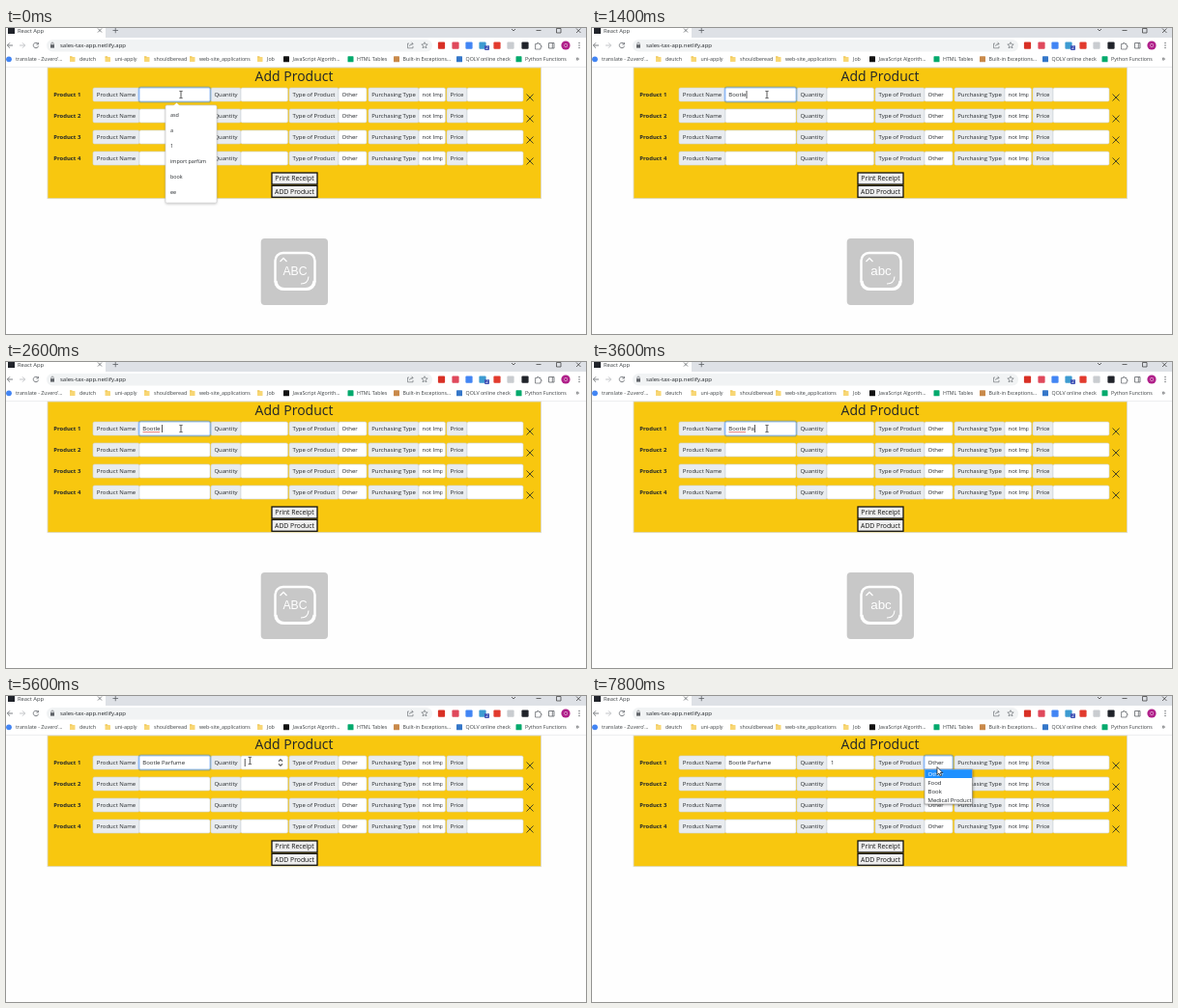
Write an HTML page that moves like this. It is 600 by 317 pixels and loops after 8000 ms.

```html
<!DOCTYPE html>
<html lang="en">
<head>
<meta charset="utf-8">
<title>Add Product</title>
<style>
html, body { margin: 0; width: 100%; height: 100%; overflow: hidden; background: #fefefe; }
svg { display: block; width: 600px; height: 317px; }
text { font-family: "Open Sans", "Noto Sans", sans-serif; white-space: pre; }
.key { font-family: "Liberation Sans", Arial, sans-serif; }
</style>
</head>
<body>
<svg viewBox="0 0 600 317" xmlns="http://www.w3.org/2000/svg">
  <defs><clipPath id="cut"><rect x="428" y="40" width="23.5" height="120"/></clipPath></defs>
  <g id="still"></g>
  <g id="live"></g>
</svg>
<script>
const LOOP = 8000, STEP = 200;
const INK = '#212529';
const still = document.getElementById('still'), live = document.getElementById('live');

const rect = (x, y, w, h, fill, extra = '') =>
  `<rect x="${x}" y="${y}" width="${w}" height="${h}" fill="${fill}" ${extra}/>`;
const path = (d, color, width = 0.8, extra = '') =>
  `<path d="${d}" fill="none" stroke="${color}" stroke-width="${width}" ${extra}/>`;
const dot = (x, y, r, fill) => `<circle cx="${x}" cy="${y}" r="${r}" fill="${fill}"/>`;
// Text is placed by its left edge and vertical centre.
const text = (s, x, y, size = 6, fill = INK, extra = '') =>
  `<text x="${x}" y="${y + size * 0.36}" font-size="${size}" fill="${fill}" ${extra}>${s}</text>`;
const centred = 'text-anchor="middle"';

function browser() {
  const gray = '#5f6368';
  let s = rect(0, 0, 600, 10, '#dee1e6') + rect(0, 0, 103, 10, '#fff') + rect(0, 10, 600, 30, '#fff');
  s += rect(2, -1, 7, 7, '#20232a') + text('React App', 12, 2.5, 5.8, '#3c4043');
  s += path('M95 0.5l4 4m0-4l-4 4M110.5 2.5h5.5m-2.75-2.75v5.5', gray);
  s += path('M523 1l2 2 2-2M548.5 2.5h5M569.5 0.5h4.5v4.5h-4.5zM590 0.5l4.5 4.5m0-4.5l-4.5 4.5', '#333', 0.7);
  s += rect(42, 12, 399, 12.5, '#f1f3f4', 'rx="6.2"');
  s += path('M7 18H1.5m2.5-2.7L1.3 18 4 20.7', gray);
  s += path('M14 18h5.5M17 15.3l2.7 2.7L17 20.7', '#b5b8bb');
  s += path('M33 16.2a2.7 2.7 0 1 0 .6 2.4M33.4 15v2h-2', gray);
  s += rect(46, 17.2, 4, 3.4, gray) + path('M46.8 17.2v-1a1.2 1.2 0 0 1 2.4 0v1', gray, 0.6);
  s += text('sales-tax-app.netlify.app', 56, 18, 6);
  s += path('M417 16h-1.5v4.8h5.5v-2M417.5 19q0-2.7 3.5-2.7m-1.5-1.6l1.6 1.6-1.6 1.6', gray, 0.6);
  s += path('M433 14.7l.9 2.1 2.3.2-1.8 1.5.6 2.3-2-1.2-2 1.2.6-2.3-1.8-1.5 2.3-.2z', gray, 0.6);
  const tools = [[450.5, '#d93025'], [465, '#e0495c'], [479, '#4285f4'], [493, '#3d9bd1'],
    [508, '#e23b2e'], [522, '#c9ccd0'], [537, '#20232a']];
  for (const [x, c] of tools) s += rect(x - 3.6, 14.6, 7.2, 7.2, c, 'rx="1"');
  s += rect(495, 18, 5, 5, '#3f51b5', 'rx="1"') + text('2', 497.5, 20.5, 4.5, '#fff', centred);
  s += path('M547.5 16.5h2v-1h1.5v1h2v2h1v1.5h-1v2h-5.5z', gray, 0.7);
  s += path('M561.5 15.5h5.5v5.5h-5.5zM565.3 15.5v5.5', gray, 0.8);
  s += dot(579, 18, 4.6, '#b0208a') + text('O', 579, 18, 4.8, '#fff', centred);
  for (const y of [15.5, 18, 20.5]) s += dot(593, y, 0.7, gray);
  return s + bookmarks() + rect(0, 40, 600, 0.6, '#e3e5e8');
}

function bookmarks() {
  const folder = '#f8d775';
  const items = [
    ['translate - Zuvero\u2019...', 10, '#4285f4'], ['deutch', 76, folder], ['uni-apply', 112.5, folder],
    ['shouldberead', 153, folder], ['web-site_applications', 200, folder], ['Job', 270, folder],
    ['JavaScript Algorith...', 296.5, '#111'], ['HTML Tables', 363, '#04aa6d'],
    ['Built-in Exceptions...', 410.5, '#c98a4b'], ['QOLV online check', 475.5, '#3577c9'],
    ['Python Functions', 537, '#04aa6d']];
  let s = '';
  for (const [label, x, c] of items) {
    const mark = x === 10 ? dot(3, 32.3, 2.9, c)
      : c === folder ? rect(x - 10, 30, 5.5, 5, c, 'rx=".6"') + rect(x - 10, 29.3, 2.5, 1.2, '#eec24c')
      : rect(x - 9.5, 29.3, 6, 6, c, 'rx=".6"');
    s += mark + text(label, x, 32.2, 5.3, '#3c4043');
  }
  return s + text('»', 589.5, 31.8, 7);
}

function row(n) {
  const y = 69 + 22 * n, top = y - 7;
  const box = (x, w, fill) => rect(x, top, w, 14, fill, 'rx="1.6" stroke="#ced4da" stroke-width=".6"');
  const fields = [['Product Name', 90, 138, 211], ['Quantity', 212, 243, 291.5], ['Type of Product', 293, 344, 373],
    ['Purchasing Type', 375, 427, 454.5], ['Price', 456, 477, 535]];
  let s = text(`Product ${n + 1}`, 49.3, y, 5.9, INK, 'font-weight="700"');
  for (const [label, x, mid, end] of fields)
    s += box(x, mid - x, '#e9ecef') + box(mid, end - mid, '#fff') + text(label, (x + mid) / 2, y, 6, INK, centred);
  s += text('Other', 347.5, y) + `<g clip-path="url(#cut)">${text('not Imported', 430.5, y)}</g>`;
  return s + path(`M538.5 ${y - 0.5}l7 7m0-7l-7 7`, INK, 0.8);
}

function button(label, y) {
  return rect(275, y, 47, 12, '#efefef', 'stroke="#111" stroke-width="1.3"')
    + text(label, 298.5, y + 6, 6.8, '#111', centred);
}

function page() {
  let s = rect(43, 41, 510.5, 135.7, '#f8c70f', 'stroke="#d9d9d3" stroke-width=".8"');
  s += text('Add Product', 298, 50, 14, INK, centred + ' font-weight="500"');
  for (let n = 0; n < 4; n++) s += row(n);
  return s + button('Print Receipt', 150) + button('ADD Product', 163.3);
}

// Caps-lock notice: shown, half faded, or gone.
function capsKey(t) {
  const alpha = t === 2200 || t === 4800 ? 0.5 : t === 2400 || t >= 5000 ? 0 : 1;
  if (!alpha) return '';
  const upper = t < 400 || (t >= 2600 && t < 3000);
  return `<g opacity="${alpha}">` + rect(263.7, 218, 69.3, 69, '#c8c8c8', 'rx="4"')
    + rect(278.5, 233, 41, 37.5, 'none', 'rx="8" stroke="#fff" stroke-width="2.4"')
    + path('M279 262q1 8.5 9 8.5h22q8 0 9-8.5', '#fff', 3)
    + path('M283.5 242l3.5-3.5 3.5 3.5', '#fff', 1.3)
    + path('M305 265q7.5 0 8-7.5', '#fff', 1.1)
    + text(upper ? 'ABC' : 'abc', 299, 251.5, upper ? 12.2 : 13.4, '#fff', centred + ' class="key"') + '</g>';
}

function nameAt(t) {
  const keys = [200, 400, 600, 800, 1000, 1400, 2000, 2800, 3200, 4000, 4200, 4400, 4600, 4800];
  return 'Bootle Parfume'.slice(0, keys.filter(k => k <= t).length);
}

function popup(x, items) {
  return rect(x, 80, 53, 4.6 + 16.1 * items.length, '#fff',
      'rx="1.5" stroke="#cfcfcf" stroke-width=".7" style="filter:drop-shadow(0 1px 1px #0003)"')
    + rect(0, 0, 5, 5, '#fff', `transform="translate(${x + 11.5} 77.5) rotate(45)"`)
    + items.map((s, i) => text(s, x + 5, 90 + 16.1 * i, 5.4)).join('');
}

function options() {
  const names = ['Other', 'Food', 'Book', 'Medical Product'];
  return rect(344, 76, 49.3, 36, '#fff', 'stroke="#8a8a8a" stroke-width=".7" style="filter:drop-shadow(1px 1px 1px #0004)"')
    + rect(344.3, 76.2, 48.7, 8.8, '#1e90ff')
    + names.map((s, i) => text(s, 347.5, 80.8 + 9 * i, 6, i ? INK : '#fff')).join('');
}

function mouse(t) {
  const stops = [[0, 181, 69], [5200, 190, 69], [5400, 225, 68], [5600, 252.3, 67],
    [6200, 338, 65], [6400, 350.5, 64], [7600, 354, 69], [7800, 357, 73.5]];
  const [, x, y] = stops.filter(s => s[0] <= t).pop();
  if (t < 6200)
    return path(`M${x - 1.6} ${y - 3.6}h1.2l.4.5.4-.5h1.2M${x} ${y - 3.2}v6.4M${x - 1.6} ${y + 3.6}h1.2l.4-.5.4.5h1.2`, '#111', 0.7);
  return `<path d="M${x} ${y}v8.2l1.9-1.7 1.3 2.9 1.4-.6-1.3-2.8h2.5z" fill="#fff" stroke="#111" stroke-width=".7"/>`;
}

function draw(t) {
  const ring = (x, w) => rect(x, 62, w, 14, '#fff', 'rx="1.6" stroke="#0d6efd" stroke-opacity=".3" stroke-width="3"')
    + rect(x, 62, w, 14, '#fff', 'rx="1.6" stroke="#86b7fe" stroke-width=".8"');
  const caret = x => rect(x, 65, 0.7, 8, '#111');
  const name = nameAt(t);

  let s = t < 5800 ? ring(138, 73) : t < 6800 ? ring(243, 48.5) : ring(344, 29) + text('Other', 347.5, 69);
  s += text(name, 141.3, 69, 6, INK, 'id="name"');
  if (t >= 2000 && t < 5600) s += path('M141.5 72.6H159', '#e04a3f', 0.7);
  if (t >= 5600 && t < 6800)
    s += path('M282 67.7l2-2 2 2M282 70.3l2 2 2-2', '#444', 1.1);
  if (t === 5600 || t === 5800) s += caret(246.8);
  if (t >= 6000) s += text('1', 247, 69);
  if (t < 200) s += popup(165, ['asd', 'a', '1', 'import parfüm', 'book', 'ee']);
  else if (t < 800) s += popup(165, ['book']);
  if (t === 6000) s += popup(258, ['1']);
  if (t >= 6800) s += options();
  live.innerHTML = s + capsKey(t);

  let top = mouse(t);
  if (name && t < 5600 && t !== 3400)
    top = caret(141.5 + document.getElementById('name').getComputedTextLength()) + top;
  live.insertAdjacentHTML('beforeend', top);
}

still.innerHTML = browser() + page();
const start = performance.now();
let shown = -1;
function tick() {
  const t = Math.floor((performance.now() - start) % LOOP / STEP) * STEP;
  if (t !== shown) draw(shown = t);
  requestAnimationFrame(tick);
}
tick();
</script>
</body>
</html>
```
